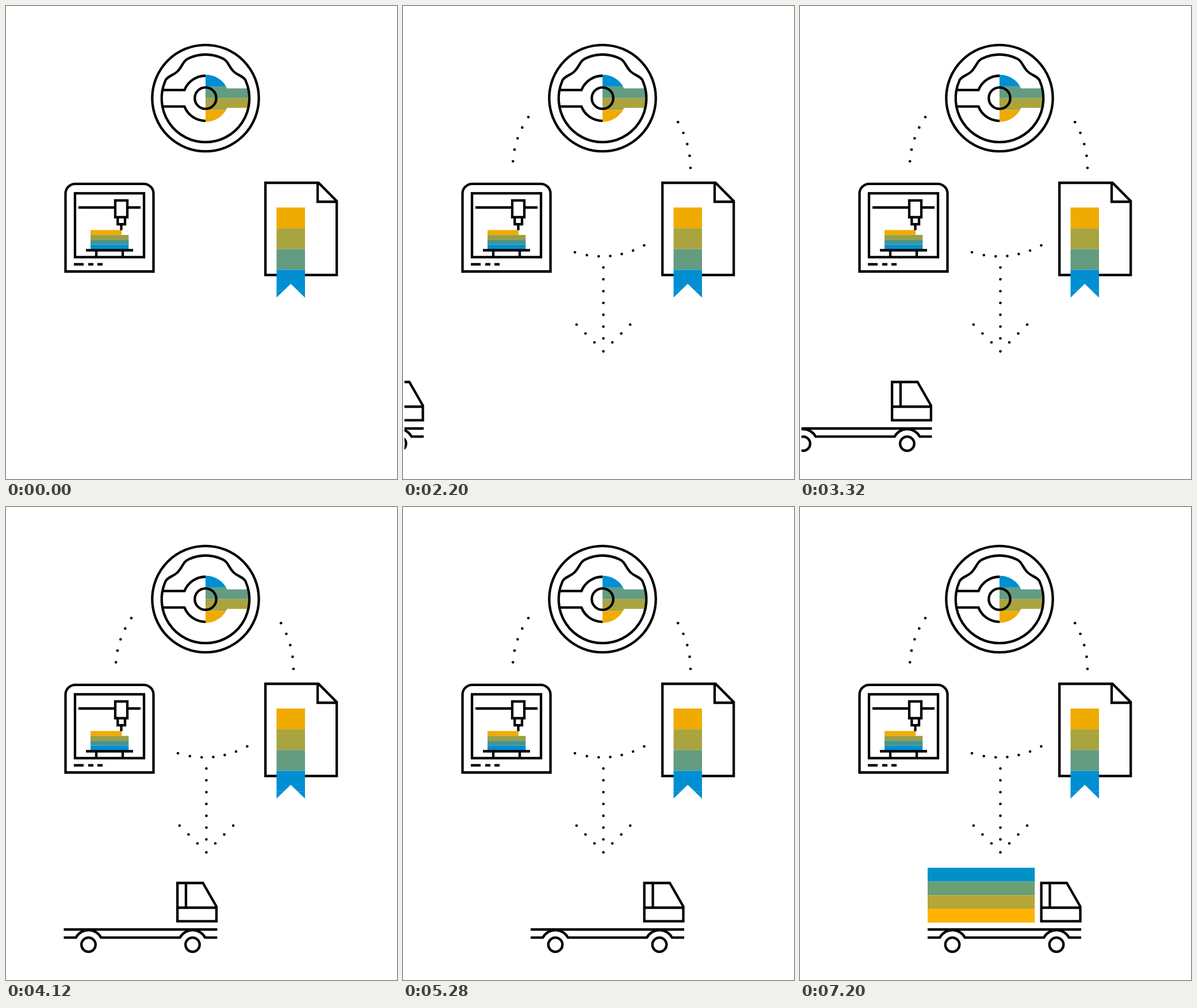
These frames come from a looping animation (680x824 px, 7.68 s). An HTML page:

```html
<!DOCTYPE html>
<html lang="en">
<head>
<meta charset="utf-8">
<title>Design, print, certify, deliver</title>
<style>
  html, body { margin: 0; width: 100%; height: 100%; overflow: hidden; background: #fff; }
  svg { display: block; width: 680px; height: 824px; }
  .line { fill: none; stroke: #000; stroke-width: 4.3; }
  .white { fill: #fff; }
</style>
</head>
<body>
<svg viewBox="0 0 680 824">
  <defs>
    <clipPath id="hub"><path d="M347 119.5A41.3 41.3 0 0 1 384.5 143.5H421V177.5H384.5A41.3 41.3 0 0 1 347 202Z"/></clipPath>
    <clipPath id="ribbon"><path d="M470.5 351H520V508L495.2 484L470.5 508Z"/></clipPath>
    <clipPath id="dotWipe"><rect id="dotWindow" width="680" height="0"/></clipPath>
    <clipPath id="cargoWipe"><rect id="cargoWindow" x="222" width="186.5" y="724" height="0"/></clipPath>
    <clipPath id="road"><rect x="2.5" y="600" width="677.5" height="224"/></clipPath>
  </defs>

  <g id="wheel">
    <g id="hubBands" clip-path="url(#hub)"></g>
    <g class="line">
      <circle cx="347" cy="160.5" r="92.7"/>
      <path d="M276.8 131A76.3 76.3 0 1 0 417.2 131C415 122 401 121 394 112C386 103 386 95 376 91Q362 84.5 347 84.5Q332 84.5 318 91C308 95 308 103 300 112C293 121 279 122 276.8 131Z"/>
      <path d="M347 121.5A39.3 39.3 0 0 0 310.4 146.4H272M272 175.1H310.4A39.3 39.3 0 0 0 347 200.1"/>
      <circle cx="347" cy="160.5" r="18.7"/>
    </g>
  </g>

  <g id="printer">
    <g id="printBands"></g>
    <g class="line">
      <path d="M103.5 462.5V326.8A17 17 0 0 1 120.5 309.8H239.5A17 17 0 0 1 256.5 326.8V462.5Z"/>
      <rect x="120" y="326.3" width="120" height="111.2"/>
      <path d="M126 351H234M139 425.5H221M157 427V437M203 427V437M118 450H135M143 450H152M159 450H168M200.5 380V390.5"/>
      <rect class="white" x="190" y="338.7" width="21" height="29.3"/>
      <rect class="white" x="194.3" y="368" width="12.7" height="12.2"/>
    </g>
  </g>

  <g id="certificate">
    <path class="line" d="M451.2 308H543.5L575.2 340V468.7H451.2ZM542 308V341H575"/>
    <g id="ribbonBands" clip-path="url(#ribbon)"></g>
  </g>

  <g id="dots" clip-path="url(#dotWipe)"></g>

  <g clip-path="url(#road)">
    <g id="truck" class="line">
      <path d="M419.7 655H464L487.5 696V721.6H419.7ZM419.7 698H487.5M434.5 655V698"/>
      <path d="M222 736H489M222 750.2H243A25 25 0 0 1 287 750.2H424A25 25 0 0 1 468 750.2H489"/>
      <circle cx="265" cy="762.5" r="12.3"/>
      <circle cx="446" cy="762.5" r="12.3"/>
    </g>
  </g>
  <g id="cargo" clip-path="url(#cargoWipe)"></g>
</svg>

<script>
const LOOP = 7680, STEP = 40;
const BLUE = '#008fd3', GREEN = '#639c80', OLIVE = '#a9a43f', YELLOW = '#f0ab00';
const $ = id => document.getElementById(id);

function add(parent, tag, attrs) {
  const el = document.createElementNS('http://www.w3.org/2000/svg', tag);
  for (const key in attrs) el.setAttribute(key, attrs[key]);
  $(parent).appendChild(el);
}

// Equal coloured bands stacked downwards.
function bands(parent, x, y, width, height, colors) {
  colors.forEach((fill, i) => add(parent, 'rect', { x, y: y + i * height, width, height, fill }));
}

const dot = (cx, cy) => add('dots', 'circle', { cx, cy, r: 2.3 });

// Evenly spaced dots on a quadratic curve from a to c, bent towards b.
function dottedCurve(a, b, c, count) {
  for (let i = 0; i < count; i++) {
    const t = i / (count - 1), u = 1 - t;
    const at = k => u * u * a[k] + 2 * u * t * b[k] + t * t * c[k];
    dot(at(0), at(1));
  }
}

function dottedArrow(x, top, tip) {
  for (let i = 0; i < 7; i++) dot(x, top + 20.6 * i);
  dot(x, tip);
  for (let i = 1; i <= 3; i++) {
    const d = 15.55 * i;
    dot(x - d, tip - d);
    dot(x + d, tip - d);
  }
}

bands('hubBands', 347, 119.5, 80, 20.6, [BLUE, GREEN, OLIVE, YELLOW]);
bands('printBands', 147, 390.3, 54, 8.45, [YELLOW]);
bands('printBands', 147, 398.75, 66.3, 8.45, ['#9a9f48', '#47948c', BLUE]);
bands('ribbonBands', 470, 351, 51, 36.2, [YELLOW, OLIVE, GREEN, BLUE, BLUE]);
bands('cargo', 222, 628.5, 186.5, 23.9, ['#0091c8', '#6a9e75', '#b4a638', '#ffb200']);

dottedCurve([218, 193.5], [194, 229], [191.2, 270.5], 5);
dottedCurve([478.2, 202.3], [499.5, 239], [500, 282], 5);
dottedCurve([299, 429], [361.7, 448], [419.5, 417], 7);
dottedArrow(348.5, 455.5, 601.6);

const progress = (t, from, to) => Math.min(1, Math.max(0, (t - from) / (to - from)));

function draw(t) {
  // The curves appear from the top, then the arrow.
  $('dotWindow').setAttribute('height', 190 + 260 * progress(t, 0, 800) + 156 * progress(t, 800, 1960));

  const truckX = -487.5 * (1 - progress(t, 2000, 4824));
  $('truck').setAttribute('transform', `translate(${truckX} 0)`);
  $('truck').setAttribute('visibility', t >= 2000 ? 'visible' : 'hidden');

  const load = 96 * progress(t, 5280, 5960);
  $('cargoWindow').setAttribute('y', 724 - load);
  $('cargoWindow').setAttribute('height', load);
}

const start = performance.now();
function tick() {
  const t = (performance.now() - start) % LOOP;
  draw(Math.floor(t / STEP) * STEP);
  requestAnimationFrame(tick);
}
tick();
</script>
</body>
</html>
```
